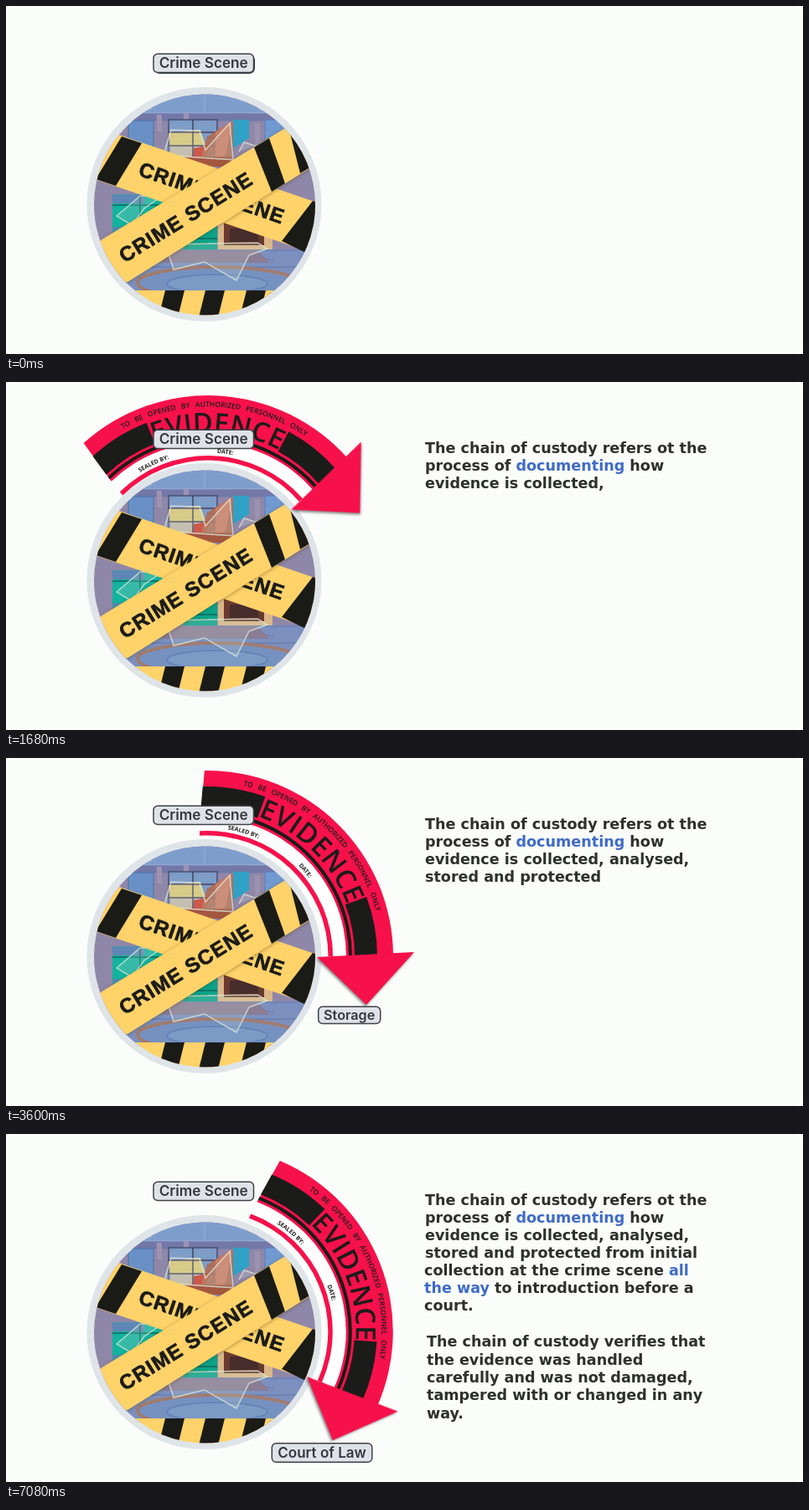
Recreate the animation shown at these times as an HTML page. Size 951 px wide and 416 px high, loop 7.2 s.

```html
<!DOCTYPE html>
<html lang="en">
<head>
<meta charset="utf-8">
<title>Chain of custody</title>
<style>
  html, body { margin: 0; width: 100%; height: 100%; overflow: hidden; background: #fff; }
  svg { display: block; }
  .body { font: bold 17.57px "DejaVu Sans", sans-serif; fill: #2e302e; white-space: pre; }
  .body .key { fill: #3f6bc8; }
  .label rect { fill: #dfe3e8; stroke: #3d4148; stroke-width: 1.5; }
  .label text { font-family: Inter, sans-serif; font-weight: 600; fill: #34373f; text-anchor: middle; }
  .tape {
    font: bold 24.5px "Liberation Sans", Arial, sans-serif; letter-spacing: 1.1px;
    fill: #1a1b17; stroke: #1a1b17; stroke-width: .7; stroke-linejoin: round; text-anchor: middle;
  }
  .seal { font-family: "Open Sans", sans-serif; fill: #1c1c1a; }
  .arrow { fill: #f7114a; filter: drop-shadow(-1px 2px 1.5px rgba(40, 40, 40, .55)); }
</style>
</head>
<body>
<svg width="951" height="416" viewBox="0 0 951 416">
  <defs>
    <clipPath id="lens"><circle cx="237" cy="237.500" r="132"/></clipPath>
  </defs>
  <rect width="951" height="416" rx="13" fill="#fbfdfa"/>

  <circle cx="236.500" cy="237" r="140" fill="#dfe4e8"/>
  <g clip-path="url(#lens)">
    <!-- kitchen -->
    <rect x="100" y="100" width="280" height="245" fill="#8f87a8"/>
    <rect x="100" y="100" width="280" height="28" fill="#7f9dcc"/>
    <path d="M100 128H380M185 106L170 128M237 105V128M290 106L305 128" stroke="#98b2d8" fill="none"/>
    <path d="M100 133H380" stroke="#7278a8" stroke-width="9"/>
    <path d="M150 148V180M183 130V150M215 128V136M300 140V170" stroke="#9c93b2" stroke-width="6"/>
    <rect x="146" y="137" width="30" height="48" fill="#6990c4" stroke="#4f71a8"/>
    <rect x="194" y="136" width="58" height="46" fill="#7d9cc8" stroke="#4a4f70" stroke-width="1.500"/>
    <path d="M194 152L232 148L238 166L196 168Z" fill="#dcc878"/>
    <path d="M196 168H238L234 180H196Z" fill="#c3b9a8"/>
    <path d="M224 170L244 166L238 182H222Z" fill="#cf3a2d"/>
    <path d="M223 136V182M194 151H252M194 167H252" stroke="#45435c" stroke-width="1.500"/>
    <path d="M232 184L240 156L271 137V190H232Z" fill="#b5684a" opacity=".85"/>
    <path d="M250 151L271 137L262 178L250 182Z" fill="#cc7c64"/>
    <path d="M271 136H290V158L271 170Z" fill="#2fa0c6"/>
    <rect x="309" y="136" width="34" height="40" fill="#7299cf" stroke="#5880b8"/>
    <path d="M186 180H268V192H186Z" fill="#a4573f"/>
    <path d="M127 225H250V291H127Z" fill="#4a92b0"/>
    <path d="M127 226H200V264H127Z" fill="#12b39e"/>
    <path d="M127 226H165V236H127Z" fill="#5e86b6"/>
    <path d="M212 250H252V291H212Z" fill="#0aa487"/>
    <path d="M127 238H195M160 226V264M212 263H252M212 278H252M225 270H240M225 284H240" stroke="#08695f" stroke-width="1.500"/>
    <path d="M253 250H318V292H253Z" fill="#dcb787"/>
    <path d="M260 258H308V286H260Z" fill="#6a3a2e"/>
    <path d="M267 266H301V282H267Z" fill="#472c2b"/>
    <path d="M100 291H380V345H100Z" fill="#7b90bf"/>
    <path d="M100 292H380M170 303H320M128 312H350" stroke="#6379ab"/>
    <path d="M200 292H300L315 307H185Z" fill="#8a7c94"/>
    <ellipse cx="252" cy="331" rx="95" ry="19" fill="#7691c0" stroke="#a07c70" stroke-width="4"/>
    <ellipse cx="252" cy="332" rx="60" ry="11" fill="#7d99c6" stroke="#6684b8" stroke-width="2"/>
    <g fill="#c5d6c8" fill-opacity=".2" stroke="#dceade" stroke-opacity=".75" stroke-width="1.500">
      <path d="M188 178L197 148L231 149L238 172L267 140L271 184Z"/>
      <path d="M278 174L284 163L300 168L312 162"/>
      <path d="M132 251L160 227L188 226L165 242L150 262Z"/>
      <path d="M190 285L200 315L237 306L275 328L290 298L312 290L300 283Z"/>
    </g>

    <!-- tapes -->
    <path d="M100 142L380 238V300L100 205Z" fill="#ffd26a"/>
    <path d="M138 156L162 164L131 215L107 207ZM366 233L390 240L360 296L329 281Z" fill="#1a1b17"/>
    <text class="tape" transform="translate(243 231.500) rotate(18.700)">CRIME SCENE</text>
    <path d="M90 294L338 143L380 128L375 186L145 330L100 345Z" fill="#ffd26a" style="filter:drop-shadow(0 1px 2px rgba(60,40,10,.4))"/>
    <path d="M296 169L314 158L333 212L317 222ZM337 144L362 130L378 184L351 200Z" fill="#1a1b17"/>
    <text class="tape" transform="translate(219 259.500) rotate(-31.800)">CRIME SCENE</text>
    <path d="M140 340H340V372H140Z" fill="#ffd26a"/>
    <path id="hazard" fill="#1a1b17"/>
  </g>

  <g id="labels"></g>
  <g id="seal">
    <g id="bands"></g>
    <g id="sealText" class="seal"></g>
    <path class="arrow" d="M371 238L487 232L430 295Z"/>
  </g>
  <rect id="bevel" x="177" y="58" width="120" height="23" rx="6.500" fill="#33363c"/>
  <g id="topLabel"></g>
  <g id="copy" class="body"></g>
</svg>

<script>
const NS = "http://www.w3.org/2000/svg";
const $ = id => document.getElementById(id);
const LOOP = 7200, STEP = 120, START = 480;

function add(parent, tag, attrs = {}, text) {
  const el = document.createElementNS(NS, tag);
  for (const k in attrs) el.setAttribute(k, attrs[k]);
  if (text) el.textContent = text;
  parent.appendChild(el);
  return el;
}

// Polar helpers: degrees clockwise from the top.
const CX = 240, CY = 237;
function polar(r, deg) {
  const a = deg * Math.PI / 180;
  return (CX + r * Math.sin(a)).toFixed(2) + " " + (CY - r * Math.cos(a)).toFixed(2);
}
const slant = r => -0.8 - (222 - r) * 0.036;

function band(inner, outer, fill, from, to = 90) {
  const a = from ?? slant(inner), b = from ?? slant(outer);
  add($("bands"), "path", {
    fill,
    d: `M${polar(outer, b)}A${outer} ${outer} 0 0 1 ${polar(outer, to)}` +
       `L${polar(inner, to)}A${inner} ${inner} 0 0 0 ${polar(inner, a)}Z`
  });
}

function arcText(text, r, from, to, attrs, middle) {
  const id = "arc" + r + from;
  add($("sealText"), "path", {
    id, fill: "none", d: `M${polar(r, from)}A${r} ${r} 0 0 1 ${polar(r, to)}`
  });
  const el = add($("sealText"), "text", { ...attrs, "text-anchor": middle ? "middle" : "start" });
  add(el, "textPath", { href: "#" + id, startOffset: middle ? "50%" : 0 }, text);
}

const RED = "#f7114a", INK = "#1b1c19";
band(150, 166, "#fff");
band(166, 222, RED);
band(176, 203, INK, undefined, 20);
band(176, 203, INK, 69.5);
band(169, 173, INK);
band(144.5, 150, RED);
arcText("TO BE OPENED BY AUTHORIZED PERSONNEL ONLY", 208.5, 3, 84,
  { "font-size": 8.5, "font-weight": 600, "word-spacing": 4 }, true);
arcText("EVIDENCE", 178, 5, 84.6, { "font-size": 32.5, "font-weight": 600 }, true);
arcText("SEALED BY:", 153.5, 9.2, 60, { "font-size": 7, "font-weight": 700 });
arcText("DATE:", 153.6, 45.2, 88, { "font-size": 7, "font-weight": 700 });

$("hazard").setAttribute("d", [190, 238, 287]
  .map(x => `M${x} 340h23l-8 32h-23Z`).join(""));

function label(parent, text, x, y, w, h, size) {
  const g = add(parent, "g", { class: "label" });
  add(g, "rect", { x, y, width: w, height: h, rx: 5 });
  add(g, "text", { x: x + w / 2, y: y + h / 2 + size * 0.35, "font-size": size }, text);
  return g;
}
label($("topLabel"), "Crime Scene", 176, 57.2, 119.5, 22.3, 17.2);

// Each line: x, baseline, then text; *stars* mark highlighted words.
function block(lines) {
  const g = add($("copy"), "g");
  for (const [x, y, text] of lines) {
    const el = add(g, "text", { x, y });
    text.split("*").forEach((part, i) => {
      if (part) add(el, "tspan", i % 2 ? { class: "key" } : {}, part);
    });
  }
  return g;
}

const reveals = [
  [960, block([
    [500, 85, "The chain of custody refers ot the"],
    [500, 106, "process of *documenting* how"],
    [500, 127.3, "evidence is collected,"]])],
  [2160, block([[720, 126.5, "analysed,"]])],
  [2160, label($("labels"), "Analysis", 384.7, 206.5, 74, 22, 15.8)],
  [3120, block([[500, 148, "stored and protected"]])],
  [3120, label($("labels"), "Storage", 372.7, 297.2, 74, 20.3, 16.2)],
  [4680, block([
    [715.5, 148, "from initial"],
    [499, 168.7, "collection at the crime scene *all*"],
    [499, 190, "*the way* to introduction before a"],
    [499, 210.7, "court."]])],
  [4680, label($("labels"), "Court of Law", 317.3, 369.7, 119.5, 22.5, 17)],
  [5640, block([
    [502, 254.3, "The chain of custody verifies that"],
    [502, 275.7, "the evidence was handled"],
    [502, 297, "carefully and was not damaged,"],
    [502, 318, "tampered with or changed in any"],
    [502, 339.5, "way."]])]
];

// Time and rotation of the evidence seal.
const turns = [
  [480, -82], [600, -74], [720, -67], [1200, -59], [1680, -41.2],
  [2400, -26.3], [3600, 0], [4560, 23.9]
];
function angleAt(t) {
  if (t <= turns[0][0]) return turns[0][1];
  for (let i = 1; i < turns.length; i++) {
    const [t0, a0] = turns[i - 1], [t1, a1] = turns[i];
    if (t < t1) return a0 + (a1 - a0) * (t - t0) / (t1 - t0);
  }
  return turns[turns.length - 1][1];
}

const FADE = 240;
function draw(time) {
  const t = Math.floor((time % LOOP) / STEP) * STEP;
  const on = t >= START;
  $("seal").style.display = on ? "" : "none";
  $("bevel").style.display = on ? "none" : "";
  $("seal").setAttribute("transform", `rotate(${angleAt(t).toFixed(3)} 242 236)`);
  for (const [at, el] of reveals) {
    el.style.opacity = Math.max(0, Math.min(1, (t - at + STEP) / FADE));
    el.style.display = t < at ? "none" : "";
  }
}

const origin = performance.now();
function tick() {
  draw(performance.now() - origin);
  requestAnimationFrame(tick);
}
tick();
</script>
</body>
</html>
```
